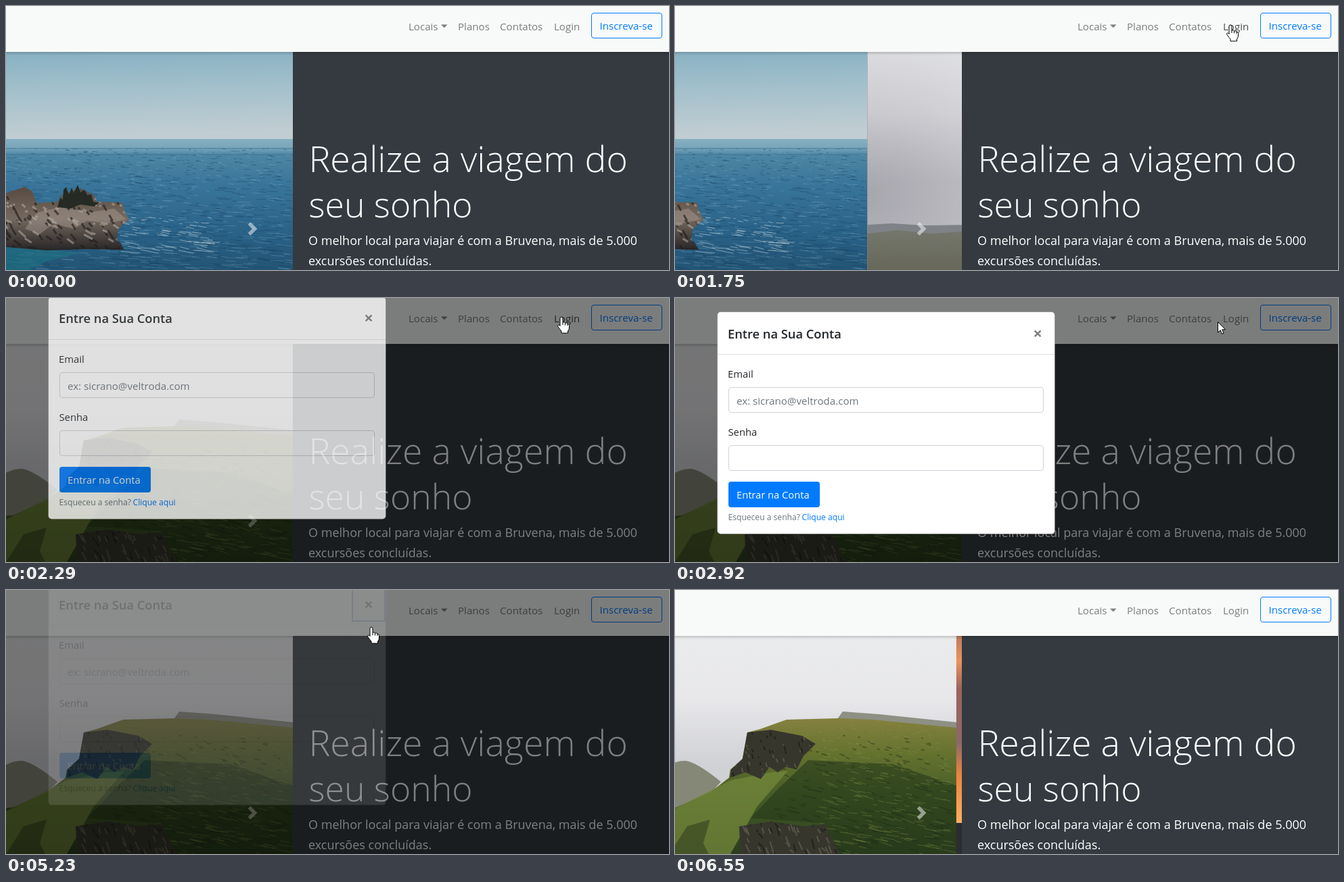
An HTML page for the animation above (6.63 s loop, 980x391 px).

```html
<!DOCTYPE html>
<html lang="pt-BR">
<head>
<meta charset="utf-8">
<title>Login modal</title>
<style>
  html, body { margin: 0; width: 100%; height: 100%; overflow: hidden; background: #343a40; }
  svg { display: block; width: 980px; height: 391px; }
  text { font-family: "Open Sans", "Noto Sans", sans-serif; font-size: 15.1px; white-space: pre; }
  .nav { fill: #000; fill-opacity: .5; }
  .nav.active { fill-opacity: .7; }
  .hero { fill: #fff; font-weight: 300; }
  .lead { fill: #fff; font-size: 18px; }
  .label { fill: #212529; font-size: 14.8px; }
  .small { font-size: 12.1px; fill: #6c757d; }
  .field { fill: #fff; stroke: #ced4da; }
  .texture { fill: none; }
</style>
</head>
<body>
<svg viewBox="0 0 980 391" xmlns="http://www.w3.org/2000/svg">
  <defs>
    <linearGradient id="sky" x2=".12" y2="1">
      <stop stop-color="#80adc1"/><stop offset=".5" stop-color="#a1bfcb"/><stop offset="1" stop-color="#c0cdd2"/>
    </linearGradient>
    <linearGradient id="sea" x2="0" y2="1">
      <stop stop-color="#86afc1"/><stop offset=".07" stop-color="#78a5ba"/><stop offset=".12" stop-color="#4d86a4"/>
      <stop offset=".35" stop-color="#39759a"/><stop offset=".7" stop-color="#2a6288"/><stop offset="1" stop-color="#235475"/>
    </linearGradient>
    <linearGradient id="rock" x2="0" y2="1">
      <stop stop-color="#584a40"/><stop offset=".5" stop-color="#75695f"/><stop offset="1" stop-color="#272526"/>
    </linearGradient>
    <linearGradient id="cloud" x2="0" y2="1">
      <stop stop-color="#eaebed"/><stop offset=".3" stop-color="#e8e8eb"/><stop offset=".6" stop-color="#d0d1d5"/>
    </linearGradient>
    <radialGradient id="haze" cx="0" cy=".66" r=".9" fx="0" fy=".66">
      <stop stop-color="#85838d" stop-opacity=".55"/><stop offset=".4" stop-color="#85838d" stop-opacity=".3"/>
      <stop offset="1" stop-color="#85838d" stop-opacity="0"/>
    </radialGradient>
    <linearGradient id="plain" x2="0" y2="1">
      <stop stop-color="#77796f"/><stop offset="1" stop-color="#67685a"/>
    </linearGradient>
    <linearGradient id="hill" x2="0" y2="1">
      <stop stop-color="#85813f"/><stop offset=".25" stop-color="#66732f"/>
      <stop offset=".6" stop-color="#435a26"/><stop offset="1" stop-color="#2b3d1e"/>
    </linearGradient>
    <linearGradient id="dusk" x2="0" y2="1">
      <stop stop-color="#b5745e"/><stop offset=".16" stop-color="#ea945c"/><stop offset=".3" stop-color="#9d625c"/>
      <stop offset=".58" stop-color="#8d686b"/><stop offset=".75" stop-color="#ec853f"/><stop offset="1" stop-color="#fdb062"/>
    </linearGradient>
    <linearGradient id="shade" x2="0" y2="1">
      <stop stop-opacity=".17"/><stop offset="1" stop-opacity="0"/>
    </linearGradient>
    <path id="island" d="M-5 279L12 273L28 268L38 274L46 292L75 290L85 278L110 270L130 280L135 290L172 291L176 306L182 316L166 330L164 345L175 361L120 360L60 362L0 357Z"/>
    <path id="cliff" d="M115 211L150 207L196 216L216 228L198 246L188 266L172 262L160 270L148 262L135 280L112 270L90 278L91 266L108 250ZM103 350L150 343L200 350L230 347L252 391H105Z"/>
    <clipPath id="islandClip"><use href="#island"/></clipPath>
    <clipPath id="cliffClip"><use href="#cliff"/></clipPath>
  </defs>

  <g id="slides">
    <g>
      <rect x="-356" y="60" width="780" height="138" fill="url(#sky)"/>
      <rect x="-356" y="197" width="780" height="194" fill="url(#sea)"/>
      <path d="M-356 211H424M-356 220H424" stroke="#3f7898" stroke-width="2" opacity=".5"/>
      <path id="troughs" class="texture" stroke="#153f5e" stroke-opacity=".4"/>
      <path id="crests" class="texture" stroke="#8db8ce" stroke-opacity=".3"/>
      <path id="foam" class="texture" stroke="#dbe5e8" stroke-opacity=".5"/>
      <path d="M-5 352L60 360L110 366L60 378L34 391H-5Z" fill="#1f7080" opacity=".7"/>
      <use href="#island" fill="url(#rock)"/>
      <path d="M46 306L84 297L120 306L160 300L178 316L150 322L120 318L100 330L70 322L50 338L28 330Z" fill="#a1968d" opacity=".5"/>
      <g clip-path="url(#islandClip)" stroke-width="3">
        <path id="cracks" class="texture" stroke="#221e1d" stroke-opacity=".65"/>
        <path id="ledges" class="texture" stroke="#c0b5ab" stroke-opacity=".5"/>
      </g>
      <path d="M76 298L80 284L84 287L85 272L89 268L93 280L97 269L100 277L106 265L110 276L116 272L120 280L126 279L129 290L137 291L130 297L110 294L95 300Z" fill="#252b24"/>
    </g>
    <g transform="translate(780)">
      <rect x="-356" y="60" width="781" height="331" fill="url(#cloud)"/>
      <rect x="-356" y="60" width="400" height="331" fill="url(#haze)"/>
      <path d="M-356 324L-320 322L-270 325L-200 324L-60 312L20 322V391H-356Z" fill="#7f8387"/>
      <path d="M-356 337L-310 332L-260 337L-200 333L-60 322L20 328V391H-356Z" fill="url(#plain)"/>
      <path d="M-80 330Q-10 250 24 253Q42 256 76 284L40 325Z" fill="#868877"/>
      <path d="M246 194L256 180L310 184L425 196V215H246Z" fill="#8d9083"/>
      <path d="M-30 391V325L10 322L60 300L88 278L90 266L108 250L115 211L134 206L173 192L250 190L300 192L425 204V391Z" fill="url(#hill)"/>
      <path d="M0 328L90 282L150 270L175 268L130 320L90 391H0Z" fill="#71853a" opacity=".8"/>
      <path d="M205 252L330 258L425 290V391H250L225 345L120 338L160 295Z" fill="#263a1a" opacity=".6"/>
      <path d="M0 391L26 350L60 340L50 375L58 391Z" fill="#33401f" opacity=".6"/>
      <path id="shadows" class="texture" stroke="#1d2c14" stroke-opacity=".4" stroke-width="2"/>
      <path id="grass" class="texture" stroke="#96a04d" stroke-opacity=".35"/>
      <use href="#cliff" fill="#36362d"/>
      <g clip-path="url(#cliffClip)">
        <path id="columns" class="texture" stroke="#77735f" stroke-opacity=".5" stroke-width="2"/>
        <path id="gullies" class="texture" stroke="#14140f" stroke-opacity=".6" stroke-width="2"/>
      </g>
    </g>
    <g transform="translate(1560)">
      <rect x="-356" y="60" width="780" height="286" fill="url(#dusk)"/>
      <rect x="-356" y="345" width="780" height="46" fill="#2c2c33"/>
    </g>
  </g>
  <path d="M2.75 0l-1.5 1.5 2.5 2.5-2.5 2.5 1.5 1.5 4-4-4-4z" transform="translate(354.5 320) scale(2.5)" fill="#fff" opacity=".5"/>

  <rect x="424" y="60" width="556" height="331" fill="#343a40"/>
  <text class="hero" x="447.500" y="246" style="font-size:53.6px">Realize a viagem do</text>
  <text class="hero" x="447.500" y="313" style="font-size:51.7px">seu sonho</text>
  <text class="lead" x="447" y="354">O melhor local para viajar é com a Bruvena, mais de 5.000</text>
  <text class="lead" x="447" y="384">excursões concluídas.</text>

  <rect width="980" height="68" fill="#f8faf9"/>
  <rect y="68" width="980" height="5" fill="url(#shade)"/>
  <text class="nav" x="595" y="36">Locais</text>
  <path class="nav" d="M643 27.500h9.600l-4.800 4.800z"/>
  <text class="nav" x="668" y="36">Planos</text>
  <text class="nav" x="730" y="36">Contatos</text>
  <text class="nav" id="login" x="810" y="36">Login</text>
  <rect x="865.500" y="10.500" width="104" height="37" rx="3.500" fill="none" stroke="#007bff"/>
  <text x="877.500" y="35" fill="#007bff">Inscreva-se</text>

  <rect id="backdrop" width="980" height="391"/>

  <g id="modal">
    <rect x="62.500" y="20.500" width="499" height="329" rx="5" fill="#fff" stroke="#000" stroke-opacity=".2"/>
    <path d="M63 83.500H561" stroke="#dee2e6"/>
    <text x="78" y="59.500" fill="#212529" style="font-size:18.3px;font-weight:600">Entre na Sua Conta</text>
    <text id="close" x="536" y="60.500" text-anchor="middle" style="font-size:24px;font-weight:700">×</text>
    <rect id="ring" x="512" y="21" width="48" height="56" fill="none" stroke="#5b9dd9" stroke-width="2"/>
    <text class="label" x="78" y="118">Email</text>
    <rect class="field" x="79.500" y="132.500" width="465" height="37" rx="3.500"/>
    <text x="91" y="158" fill="#6c757d">ex: sicrano@veltroda.com</text>
    <text class="label" x="78.500" y="204">Senha</text>
    <rect class="field" x="79.500" y="218.500" width="465" height="37" rx="3.500"/>
    <rect x="79" y="272" width="135" height="38" rx="4" fill="#007bff"/>
    <text x="91" y="297" fill="#fff" style="font-size:14.7px;font-weight:500">Entrar na Conta</text>
    <text class="small" x="78.500" y="329">Esqueceu a senha?</text>
    <text class="small" x="187.500" y="329" style="fill:#007bff">Clique aqui</text>
  </g>

  <g id="cursor" stroke="#000" fill="#fff" stroke-linejoin="round">
    <path id="arrow" d="M.5 .5V16L4.200 12.600L6.600 18.300L9 17.300L6.700 11.800H11.500Z"/>
    <g id="hand">
      <path d="M-2 1Q-2 -1 0 -1Q2 -1 2 1V7Q4.500 6 5.500 8Q8 7 9 9Q11.500 9 11.500 11.500V15Q11.500 18 9.500 20V23H0V20Q-2 18 -5 13.500Q-6 11.500 -4.500 10.800Q-3 10.800 -2 12.500Z"/>
      <path d="M2 7V11M5.500 8V11.500M9 9V12" fill="none"/>
    </g>
  </g>
</svg>

<script>
const LOOP = 6630, SLIDE_WIDTH = 780;
const $ = id => document.getElementById(id);
const clamp = v => Math.min(1, Math.max(0, v));
const mix = (a, b, k) => a + (b - a) * k;
const span = (t, start, length) => clamp((t - start) / length);

// Cubic bezier (x1, 0, x2, 1), solved by bisection.
const bezier = (x1, x2) => x => {
  let lo = 0, hi = 1, s = .5;
  for (let i = 0; i < 24; i++) {
    s = (lo + hi) / 2;
    const at = 3 * x1 * s * (1 - s) ** 2 + 3 * x2 * s * s * (1 - s) + s ** 3;
    if (at < x) lo = s; else hi = s;
  }
  return x <= 0 ? 0 : x >= 1 ? 1 : s * s * (3 - 2 * s);
};
const easeInOut = bezier(.42, .58), easeOut = bezier(0, .58);

const bursts = [
  [0, 0, 1], [210, 840, 9], [920, 1520, 9], [1600, 2210, 9], [2290, 2520, 4], [2920, 3530, 9],
  [3610, 3610, 1], [3760, 3840, 2], [3990, 4530, 8], [5080, 5690, 9], [5770, 5850, 2], [6550, 6550, 1]
];
const beats = bursts.flatMap(([first, last, count]) => Array.from({ length: count },
  (_, i) => Math.round(mix(first, last, i / Math.max(1, count - 1)) / 10) * 10));

// Pointer stops: [time, x, y].
const stops = [
  [210, 786, 340], [840, 698, 303], [1520, 821, 29], [2520, 821, 29], [2920, 802, 35],
  [3530, 451, 75], [3610, 450, 75], [3760, 447, 76], [3840, 445, 77], [3910, 445, 77],
  [4530, 540, 56], [5310, 540, 56], [5690, 934, 371], [5770, 932, 376]
];
function pointerAt(t) {
  const i = stops.findIndex(stop => stop[0] > t);
  if (i === 0) return stops[0].slice(1);
  if (i < 0) return stops[stops.length - 1].slice(1);
  const [a, b] = [stops[i - 1], stops[i]];
  const k = easeInOut(span(t, a[0], b[0] - a[0]));
  return [mix(a[1], b[1], k), mix(a[2], b[2], k)];
}

function random(seed) {
  return () => (seed = seed * 16807 % 2147483647) / 2147483647;
}
// Fills a box with short strokes that grow towards its lower edge.
function streaks(id, seed, count, [x0, y0, x1, y1], length, slope) {
  const rnd = random(seed);
  let d = '';
  for (let i = 0; i < count; i++) {
    const depth = rnd(), run = length * (.3 + depth) * (.4 + rnd());
    const x = mix(x0, x1, rnd()), y = mix(y0, y1, depth);
    d += `M${x.toFixed(1)} ${y.toFixed(1)}l${run.toFixed(1)} ${(run * slope * (rnd() + .2)).toFixed(1)}`;
  }
  $(id).setAttribute('d', d);
}
streaks('troughs', 71001, 750, [-60, 210, 415, 391], 16, .1);
streaks('crests', 193001, 600, [-60, 200, 415, 391], 13, .1);
streaks('foam', 577001, 60, [165, 312, 300, 365], 18, .22);
streaks('cracks', 31001, 90, [-10, 275, 180, 362], 7, 1.6);
streaks('ledges', 47001, 60, [-10, 280, 175, 345], 8, .8);
streaks('shadows', 83001, 170, [150, 215, 410, 391], 16, .35);
streaks('grass', 911001, 240, [215, 200, 410, 391], 14, .3);
streaks('columns', 611001, 90, [88, 207, 245, 391], 4, 3);
streaks('gullies', 137001, 110, [88, 207, 245, 391], 4, 4);

function render(t) {
  const slid = easeInOut(span(t, 1574, 600)) + easeInOut(span(t, 6506, 600));
  $('slides').setAttribute('transform', `translate(${-SLIDE_WIDTH * slid})`);

  $('backdrop').setAttribute('opacity', .5 * (span(t, 2023, 150) - span(t, 5262, 150)));
  const drop = easeOut(span(t, 2173, 300)) - easeOut(span(t, 5098, 300));
  $('modal').setAttribute('transform', `translate(0 ${50 * (drop - 1)})`);
  $('modal').setAttribute('opacity', span(t, 2173, 150) - span(t, 5098, 150));
  $('ring').setAttribute('visibility', t >= 5080 ? 'inherit' : 'hidden');

  const [x, y] = pointerAt(t);
  const overLogin = t < 2370 && x > 802 && y < 50;
  const overClose = t > 3900 && t < 5380 && x > 512 && x < 561 && y < 77;
  const linkHovered = overLogin || overClose;
  $('cursor').setAttribute('transform', `translate(${Math.round(x)} ${Math.round(y)})`);
  $('cursor').style.display = t >= 210 && t < 5850 ? '' : 'none';
  $('hand').style.display = linkHovered ? '' : 'none';
  $('arrow').style.display = linkHovered ? 'none' : '';
  $('close').setAttribute('opacity', overClose ? .75 : .5);

  const loginFocused = t >= 5310 && t < 6550;
  $('login').classList.toggle('active', overLogin || loginFocused);
}

const started = performance.now();
function tick() {
  const t = (performance.now() - started) % LOOP;
  render(beats.filter(beat => beat <= t).pop());
  requestAnimationFrame(tick);
}
tick();
</script>
</body>
</html>
```
